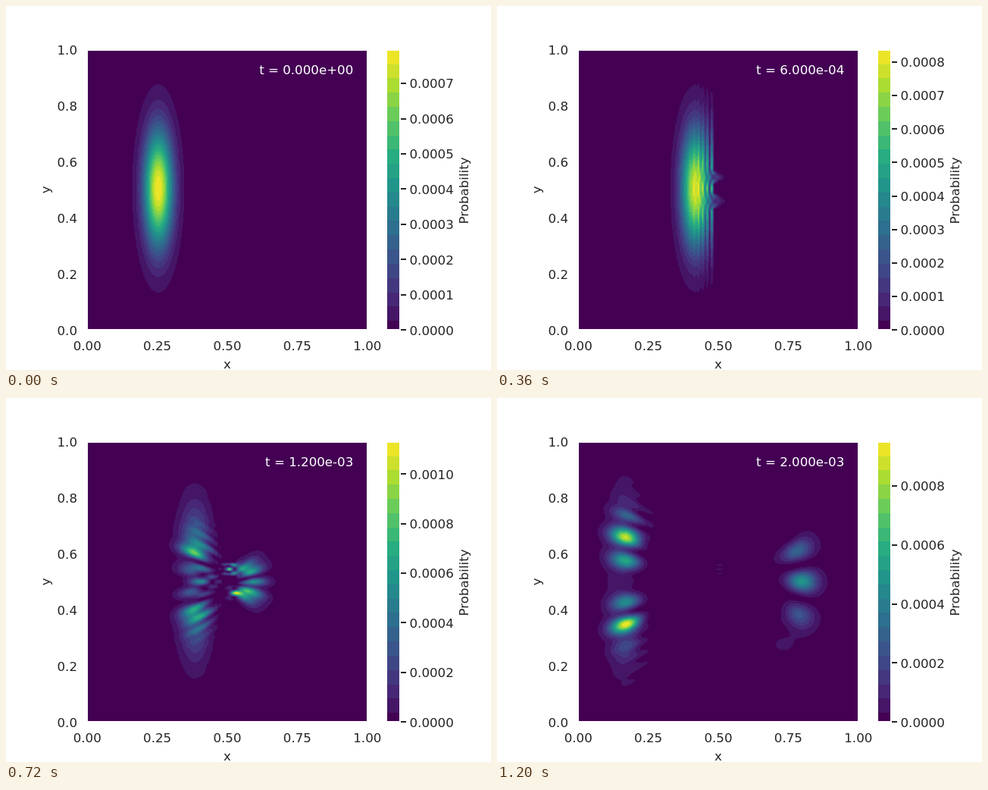
An HTML page with a canvas that plays this animation: 640 px wide and 480 px high, repeating every 1230 ms.

```html
<!DOCTYPE html>
<html lang="en">
<head>
<meta charset="utf-8">
<title>Double-slit wave packet</title>
<style>
html, body { margin: 0; width: 100%; height: 100%; overflow: hidden; background: #fff; }
canvas { display: block; }
</style>
</head>
<body>
<canvas id="stage" width="640" height="480"></canvas>
<script>
const ctx = document.getElementById('stage').getContext('2d');
const FRAMES = 41, FRAME_MS = 30;
const CELLS = 199, W = CELLS + 2;          // grid plus a zero border
const BOX = { x: 107.2, y: 57.6, size: 369.6 };
const BAR = { x: 501.6, w: 18.5 };
const BOTTOM = BOX.y + BOX.size;
const INK = '#262626';

// ---- Schrödinger equation, Crank-Nicolson with dt / (2 h²) = 1/2 ----
const at = (x, y) => (y + 1) * W + x + 1;
const inSlit = y => (y >= 86 && y <= 96) || (y >= 104 && y <= 112);
const open = [];
for (let y = 0; y < CELLS; y++)
  for (let x = 0; x < CELLS; x++)
    if (x < 96 || x > 104 || inSlit(y)) open.push(at(x, y));
const free = Int32Array.from(open);

// Chebyshev series of 2 / (1 + iM), M = 2 - (sum of neighbours) / 2
const mul = ([a, b], [c, d]) => [a * c - b * d, a * d + b * c];
const modulus = Math.sqrt(1.0625);
const rootRe = Math.sqrt((modulus - 0.25) / 2), rootIm = -0.5 / rootRe;
const ratio = [1 - rootRe, -0.5 - rootIm];
const series = [[-rootIm / modulus, -rootRe / modulus]];
for (let k = 1, c = series[0].map(v => 2 * v); k < 18; k++) series.push(c = mul(c, ratio));

function spread(part, direct, cross, sign) {
  let prev = new Float64Array(W * W), cur = part.slice();
  series.forEach(([a, b], k) => {
    const f = k ? 0.5 : 0.25, s = sign * b;
    for (let n = 0; n < free.length; n++) {
      const j = free[n];
      direct[j] += a * cur[j];
      cross[j] += s * cur[j];
      prev[j] = f * (cur[j - 1] + cur[j + 1] + cur[j - W] + cur[j + W]) - prev[j];
    }
    [prev, cur] = [cur, prev];
  });
}

function advance([re, im]) {
  const outRe = re.map(v => -v), outIm = im.map(v => -v);
  spread(re, outRe, outIm, 1);
  spread(im, outIm, outRe, -1);
  return [outRe, outIm];
}

function initialWave() {
  const re = new Float64Array(W * W), im = new Float64Array(W * W);
  const amplitude = 1 / Math.sqrt(Math.PI * 10 * 40);
  for (const j of free) {
    const dx = j % W - 51, dy = Math.floor(j / W) - 101;
    const g = amplitude * Math.exp(-dx * dx / 200 - dy * dy / 3200);
    re[j] = g * Math.cos(dx);
    im[j] = g * Math.sin(dx);
  }
  return [re, im];
}

const history = [];
for (let wave = initialWave(); history.length < FRAMES; wave = advance(advance(wave))) {
  const [re, im] = wave;
  const density = Float32Array.from(re, (v, j) => v * v + im[j] * im[j]);
  history.push({ density, max: density.reduce((a, b) => Math.max(a, b), 0) });
}

// ---- Banded viridis ----
const viridis = [[68, 1, 84], [71, 45, 123], [59, 82, 139], [44, 114, 142], [33, 145, 140],
  [40, 174, 128], [94, 201, 98], [173, 220, 48], [253, 231, 37]];
const FIRST = 0.0325, STEP = 0.0509;
const bandOf = v => v < FIRST ? 0 : Math.min(19, 1 + Math.floor((v - FIRST) / STEP));
const bands = Array.from({ length: 20 }, (_, k) => {
  const p = k ? 8 * Math.min(1, FIRST + (k - 0.5) * STEP) : 0;
  const i = Math.min(7, Math.floor(p));
  return viridis[i].map((c, n) => Math.round(c + (viridis[i + 1][n] - c) * (p - i)));
});

// ---- Drawing ----
const left = Math.floor(BOX.x), top_ = Math.floor(BOX.y), SIDE = 370;
const image = ctx.createImageData(SIDE, SIDE);
const sampler = toUnit => Array.from({ length: SIDE }, (_, p) => {
  const pos = Math.min(W - 1.001, Math.max(0, toUnit(p + 0.5) * CELLS + 0.5));
  const cell = Math.floor(pos);
  return { cell, w: (1 - Math.cos(Math.PI * (pos - cell))) / 2 };
});
const cols = sampler(p => (left + p - BOX.x) / BOX.size);
const rows = sampler(p => (BOTTOM - top_ - p) / BOX.size);

function drawDensity({ density, max }) {
  let o = 0;
  for (const r of rows) for (const c of cols) {
    const j = r.cell * W + c.cell;
    const low = density[j] + (density[j + 1] - density[j]) * c.w;
    const high = density[j + W] + (density[j + W + 1] - density[j + W]) * c.w;
    const rgb = bands[bandOf((low + (high - low) * r.w) / max)];
    image.data[o++] = rgb[0];
    image.data[o++] = rgb[1];
    image.data[o++] = rgb[2];
    image.data[o++] = 255;
  }
  ctx.putImageData(image, left, top_);
}

function text(str, x, y, align = 'center', color = INK) {
  ctx.fillStyle = color;
  ctx.textAlign = align;
  ctx.fillText(str, x, y);
}

function sideways(str, x, y) {
  ctx.save();
  ctx.translate(x, y);
  ctx.rotate(-Math.PI / 2);
  text(str, 0, 0);
  ctx.restore();
}

// White outline, snapped to whole pixels
function frameBox(x, w) {
  const x0 = Math.round(x), y0 = Math.round(BOX.y);
  ctx.strokeStyle = '#fff';
  ctx.lineWidth = 2;
  ctx.strokeRect(x0, y0, Math.round(x + w) - x0, Math.round(BOTTOM) - y0);
}

function drawColorbar(max) {
  bands.forEach((rgb, k) => {
    const y = Math.round(BOTTOM - BOX.size * (k ? FIRST + (k - 1) * STEP : 0));
    ctx.fillStyle = `rgb(${rgb})`;
    ctx.fillRect(BAR.x, BOX.y, BAR.w, y - BOX.y);
  });
  frameBox(BAR.x, BAR.w);

  const raw = max / 9, unit = 10 ** Math.floor(Math.log10(raw));
  const nice = [1, 2, 2.5, 5, 10].find(s => s * unit >= raw), step = nice * unit;
  const digits = nice === 2.5 ? 5 : 4;
  for (let k = 0; k * step <= max; k++) {
    const y = BOTTOM - BOX.size * k * step / max;
    ctx.fillStyle = INK;
    ctx.fillRect(521, Math.round(y) - 1, 7, 2);
    text((k * step).toFixed(digits), 532.5, Math.round(y + 6.3), 'left');
  }
  sideways('Probability', digits === 5 ? 620.6 : 610, 243.5);
}

function draw(frame) {
  const state = history[frame];
  ctx.fillStyle = '#fff';
  ctx.fillRect(0, 0, 640, 480);
  ctx.font = '16.67px "DejaVu Sans", sans-serif';
  drawDensity(state);
  frameBox(BOX.x, BOX.size);
  for (let k = 0; k <= 4; k++) text((k / 4).toFixed(2), BOX.x + BOX.size * k / 4, 454);
  for (let k = 0; k <= 5; k++)
    text((k / 5).toFixed(1), 94, Math.round(BOTTOM - BOX.size * k / 5 + 6.3), 'right');
  text('x', 292, 478);
  sideways('y', 58, 242.4);
  const time = (frame * 5e-5).toExponential(3).replace(/(\d)$/, '0$1');
  text('t = ' + time, 458.3, 90, 'right', '#fff');
  drawColorbar(state.max);
}

const start = performance.now();
let shown = -1;
function tick() {
  const frame = Math.floor((performance.now() - start) / FRAME_MS) % FRAMES;
  if (frame !== shown) draw(shown = frame);
  requestAnimationFrame(tick);
}
tick();
</script>
</body>
</html>
```
